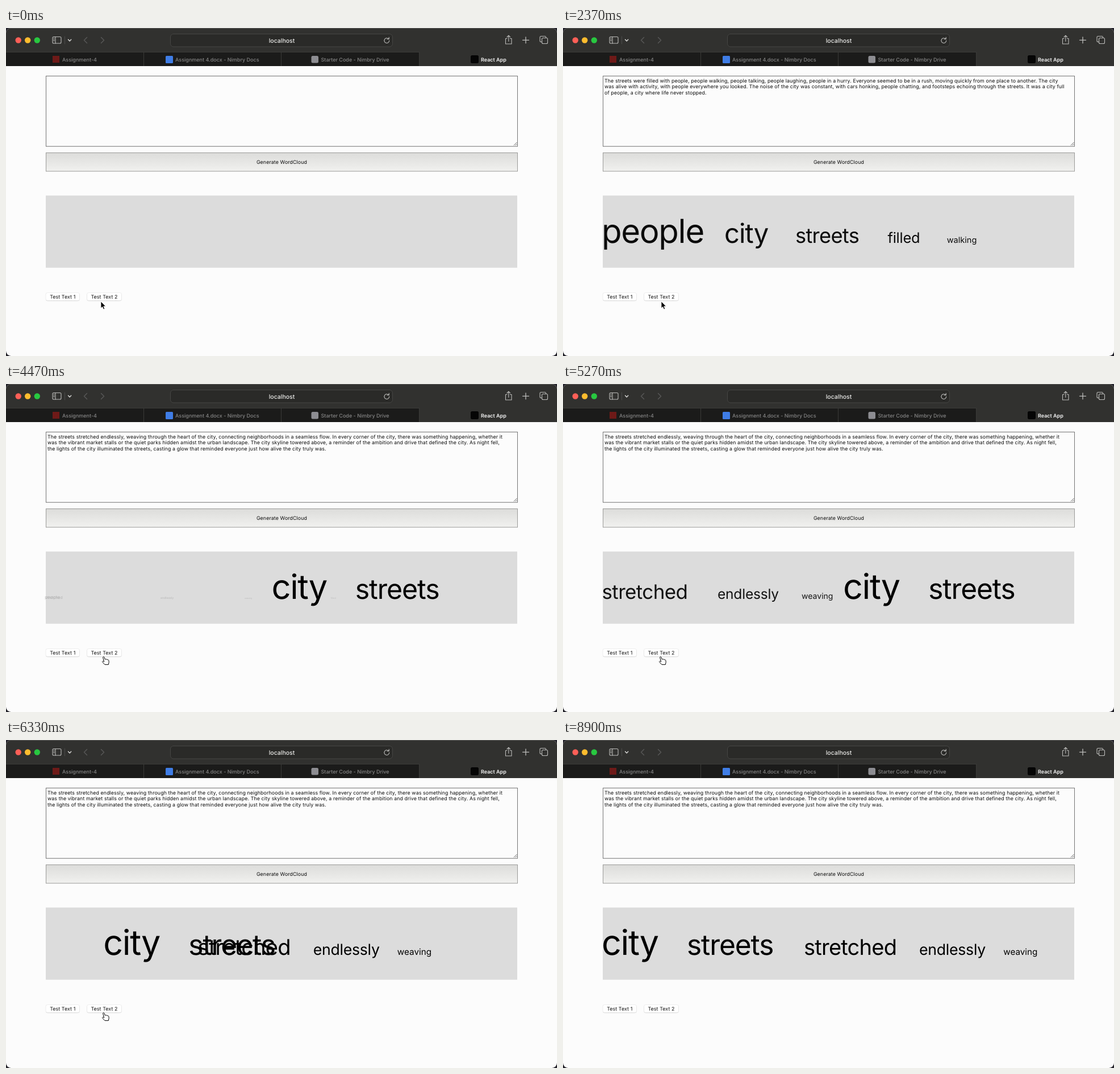
These frames come from a looping animation (970 by 577 pixels, 8930 ms). An HTML page:

```html
<!DOCTYPE html>
<html lang="en">
<head>
<meta charset="utf-8">
<title>Word cloud</title>
<style>
  html, body { margin: 0; width: 100%; height: 100%; overflow: hidden; background: #24232b; }
  svg { display: block; width: 970px; height: 577px; }
  text {
    font-family: Inter, Roboto, "Liberation Sans", sans-serif;
    font-optical-sizing: none;
    text-rendering: geometricPrecision;
  }
  .ui { font-size: 8.8px; letter-spacing: .11px; fill: #0c0c0c; }
  .tab { font-size: 9px; font-weight: 500; fill: #858585; }
  .icon { fill: none; stroke: #bdbdbb; stroke-width: 1.1; stroke-linecap: round; stroke-linejoin: round; }
  .dim { stroke: #595958; }
  .mid { text-anchor: middle; }
</style>
</head>
<body>
<svg viewBox="0 0 970 577">
  <defs>
    <clipPath id="window"><rect width="970" height="577" rx="9"/></clipPath>
    <linearGradient id="face" x2="0" y2="1">
      <stop offset="0" stop-color="#dcdcda"/>
      <stop offset="1" stop-color="#f1f1ef"/>
    </linearGradient>
  </defs>
  <g clip-path="url(#window)">
    <rect width="970" height="577" fill="#fcfcfc"/>
    <rect width="970" height="67" fill="#31312f"/>
    <path d="M8 .5H962" stroke="#5a5a58"/>

    <circle cx="21.7" cy="21.5" r="5.2" fill="#fe5f57"/>
    <circle cx="38.2" cy="21.5" r="5.2" fill="#febc2e"/>
    <circle cx="54.8" cy="21.5" r="5.2" fill="#28c840"/>
    <g class="icon">
      <rect x="82" y="15.5" width="15" height="11.5" rx="2"/>
      <path d="M87 15.5V27M84 18h1M84 20.2h1M84 22.4h1"/>
      <path d="M109.5 20.3l2.6 2.6 2.6-2.6" stroke="#dededc" stroke-width="1.4"/>
      <path class="dim" d="M103.5 15v13" stroke-width=".7"/>
      <path class="dim" d="M142.5 16.5l-5 5 5 5M167.500 16.5l5 5-5 5" stroke-width="1.4"/>
    </g>
    <rect x="289.500" y="10.500" width="391" height="22.500" rx="5.500" fill="#2a2a28" stroke="#464644"/>
    <text class="mid" x="485.500" y="25.500" font-size="10.500" font-weight="500" fill="#ececea">localhost</text>
    <g class="icon">
      <path d="M673.700 19.300a4.400 4.400 0 1 0 1 2.700M671 19.500h3.200v-3.200"/>
      <path d="M882 18.500h-2.500v9.500h10.500v-9.500h-2.500M884.800 23.500v-10M882 16l2.800-2.800 2.800 2.800"/>
      <path d="M909.500 21.300h11M915 15.800v11" stroke-width="1.300"/>
      <rect x="943.500" y="17.500" width="10" height="10" rx="2"/>
      <path d="M943.500 24.500h-1.500a2 2 0 0 1-2-2v-6a2 2 0 0 1 2-2h6.500a2 2 0 0 1 2 2v1"/>
    </g>

    <rect y="42.500" width="728" height="24.500" fill="#1b1b1a"/>
    <path d="M0 42.500H728M242.500 43V67M484.500 43V67M727.500 43V67" stroke="#3a3a38"/>
    <rect x="82" y="49" width="12" height="12" fill="#6e1a18"/>
    <text class="tab" x="99" y="58.500">Assignment-4</text>
    <rect x="281" y="49" width="13" height="13" rx="1.500" fill="#3f7de6"/>
    <text class="tab" x="298" y="58.500">Assignment 4.docx - Nimbry Docs</text>
    <rect x="537.500" y="49" width="12.500" height="12.500" rx="2.500" fill="#8d8d92"/>
    <text class="tab" x="554.500" y="58.500">Starter Code - Nimbry Drive</text>
    <rect x="818" y="48" width="14" height="14" rx="2.500" fill="#050505"/>
    <text class="tab" x="836" y="58.500" style="font-weight:600;fill:#f5f5f5">React App</text>

    <rect x="70.500" y="84.500" width="830" height="123.700" fill="#fcfcfc" stroke="#747474"/>
    <path d="M894 206.500l5.500-5.500M897 206.500l2.500-2.500" stroke="#555" stroke-width=".9"/>
    <g id="passage"></g>
    <rect x="70.500" y="219.500" width="830" height="32.500" fill="url(#face)" stroke="#9a9a98"/>
    <text class="ui mid" x="485.500" y="239.200">Generate WordCloud</text>
    <rect x="70" y="294.700" width="830" height="127" fill="#dcdcdc"/>
    <g id="cloud"></g>
    <g id="buttons"></g>
    <g id="cursor">
      <path id="arrow" d="M0 0V12L2.700 9.500 4.700 14 6.700 13.100 4.800 8.700H8.500Z" fill="#000" stroke="#fff" stroke-width=".8"/>
      <path id="hand" fill="#fff" stroke="#000" stroke-width="1" stroke-linejoin="round"
        d="M-2.300 1.200C-2.700-.4-.7-1-.1.600L1.400 4.600C1.800 3.500 3.500 3.600 3.800 4.700 4.400 3.900 5.700 4.300 5.900 5.300 6.700 4.800 7.700 5.300 7.900 6.500L8.200 9.500 7.300 13.600H.9L-2.600 9.800C-4.300 8.600-3.200 7.200-1.700 7.800L-.4 8.700Z"/>
    </g>
  </g>
</svg>
<script>
const LOOP = 8930;
const BASELINE = 377.5;
const ENTER = 2105, MOVE = 1053;
const FIRST = 751, SECOND = 3747, THIRD = 5692;   // button clicks
const SIZES = [61, 49.6, 38.1, 26.7, 15.25];      // by rank

const passages = [
  { from: FIRST, to: SECOND, lines: [
    "The streets were filled with people, people walking, people talking, people laughing, people in a hurry. Everyone seemed to be in a rush, moving quickly from one place to another. The city",
    "was alive with activity, with people everywhere you looked. The noise of the city was constant, with cars honking, people chatting, and footsteps echoing through the streets. It was a city full",
    "of people, a city where life never stopped."] },
  { from: SECOND, to: LOOP, lines: [
    "The streets stretched endlessly, weaving through the heart of the city, connecting neighborhoods in a seamless flow. In every corner of the city, there was something happening, whether it",
    "was the vibrant market stalls or the quiet parks hidden amidst the urban landscape. The city skyline towered above, a reminder of the ambition and drive that defined the city. As night fell,",
    "the lights of the city illuminated the streets, casting a glow that reminded everyone just how alive the city truly was."] }
];

const enter = (start, x, rank) => ({ start, length: ENTER, x, size: SIZES[rank], opacity: 1 });
const move = (start, x, rank) => ({ start, length: MOVE, x, size: SIZES[rank], opacity: 1 });
const leave = x => ({ start: SECOND, length: MOVE, x, size: 1, opacity: 0 });

const words = [
  { text: "people", steps: [enter(FIRST, 68, 0), leave(68)] },
  { text: "filled", steps: [enter(FIRST, 571.5, 3), leave(571.5)] },
  { text: "walking", steps: [enter(FIRST, 675.7, 4), leave(675.7)] },
  { text: "city", steps: [enter(FIRST, 284, 1), move(SECOND, 493, 0), move(THIRD, 68, 0)] },
  { text: "streets", steps: [enter(FIRST, 409, 2), move(SECOND, 643.2, 1), move(THIRD, 218, 1)] },
  { text: "stretched", steps: [enter(SECOND, 68.5, 2), move(THIRD, 424, 2)] },
  { text: "endlessly", steps: [enter(SECOND, 272, 3), move(THIRD, 627, 3)] },
  { text: "weaving", steps: [enter(SECOND, 420, 4), move(THIRD, 775.2, 4)] }
];

const buttons = [
  { label: "Test Text 1", x: 70, width: 59.5 },
  { label: "Test Text 2", x: 142.5, width: 61 }
];

// time, x, y of the pointer tip
const pointer = [
  [0, 167, 481], [100, 167, 481], [450, 112, 474], [950, 112, 474],
  [1400, 173, 481], [3200, 173, 481], [3300, 173, 480],
  [7950, 173, 480], [8300, 560, -20], [LOOP, 560, -20]
];

const byId = id => document.getElementById(id);
const clamp = v => Math.max(0, Math.min(1, v));
const mix = (a, b, v) => a + (b - a) * v;
const cubicInOut = u => u < .5 ? 4 * u ** 3 : 1 - 4 * (1 - u) ** 3;

function add(parent, tag, attrs, text = "") {
  const el = document.createElementNS("http://www.w3.org/2000/svg", tag);
  set(el, attrs);
  el.textContent = text;
  return parent.appendChild(el);
}

function set(el, attrs) {
  for (const key in attrs) el.setAttribute(key, attrs[key]);
}

for (const passage of passages) {
  passage.el = add(byId("passage"), "g", {});
  passage.lines.forEach((line, i) =>
    add(passage.el, "text", { class: "ui", x: 73, y: 95.6 + i * 10.75 }, line));
}
for (const word of words) word.el = add(byId("cloud"), "text", { y: BASELINE }, word.text);
for (const { label, x, width } of buttons) {
  const box = { x, width, height: 14, rx: 3.2 };
  add(byId("buttons"), "rect", { ...box, y: 466.3, fill: "#c9c9c9" });
  add(byId("buttons"), "rect", { ...box, y: 465.6, fill: "#fff", stroke: "#e3e3e3", "stroke-width": .6 });
  add(byId("buttons"), "text", { class: "ui mid", x: x + width / 2, y: 475.7 }, label);
}

function drawWord({ el, steps }, t) {
  let state = { x: steps[0].x, size: 1, opacity: 0 };
  for (const step of steps) {
    const v = cubicInOut(clamp((t - step.start) / step.length));
    state = {
      x: mix(state.x, step.x, v),
      size: mix(state.size, step.size, v),
      opacity: mix(state.opacity, step.opacity, v)
    };
  }
  // larger type is set tighter
  const tracking = -Math.min(.022, Math.max(0, .0009 * (state.size - 15)));
  set(el, {
    x: state.x, "font-size": state.size, opacity: state.opacity,
    "letter-spacing": tracking * state.size
  });
}

function drawPointer(t) {
  const i = Math.max(1, pointer.findIndex(p => p[0] > t));
  const [t0, x0, y0] = pointer[i - 1], [t1, x1, y1] = pointer[i];
  const v = cubicInOut(clamp((t - t0) / (t1 - t0)));
  const x = mix(x0, x1, v), y = mix(y0, y1, v);
  const over = y > 465 && y < 480.5 && buttons.some(b => x > b.x && x < b.x + b.width);
  set(byId("cursor"), { transform: `translate(${x} ${y})` });
  set(byId("hand"), { visibility: over ? "visible" : "hidden" });
  set(byId("arrow"), { visibility: over ? "hidden" : "visible" });
}

function draw(t) {
  for (const { el, from, to } of passages)
    set(el, { visibility: t >= from && t < to ? "visible" : "hidden" });
  for (const word of words) drawWord(word, t);
  drawPointer(t);
}

const began = performance.now();
function tick() {
  draw((performance.now() - began) % LOOP);
  requestAnimationFrame(tick);
}
draw(0);
requestAnimationFrame(tick);
</script>
</body>
</html>
```
